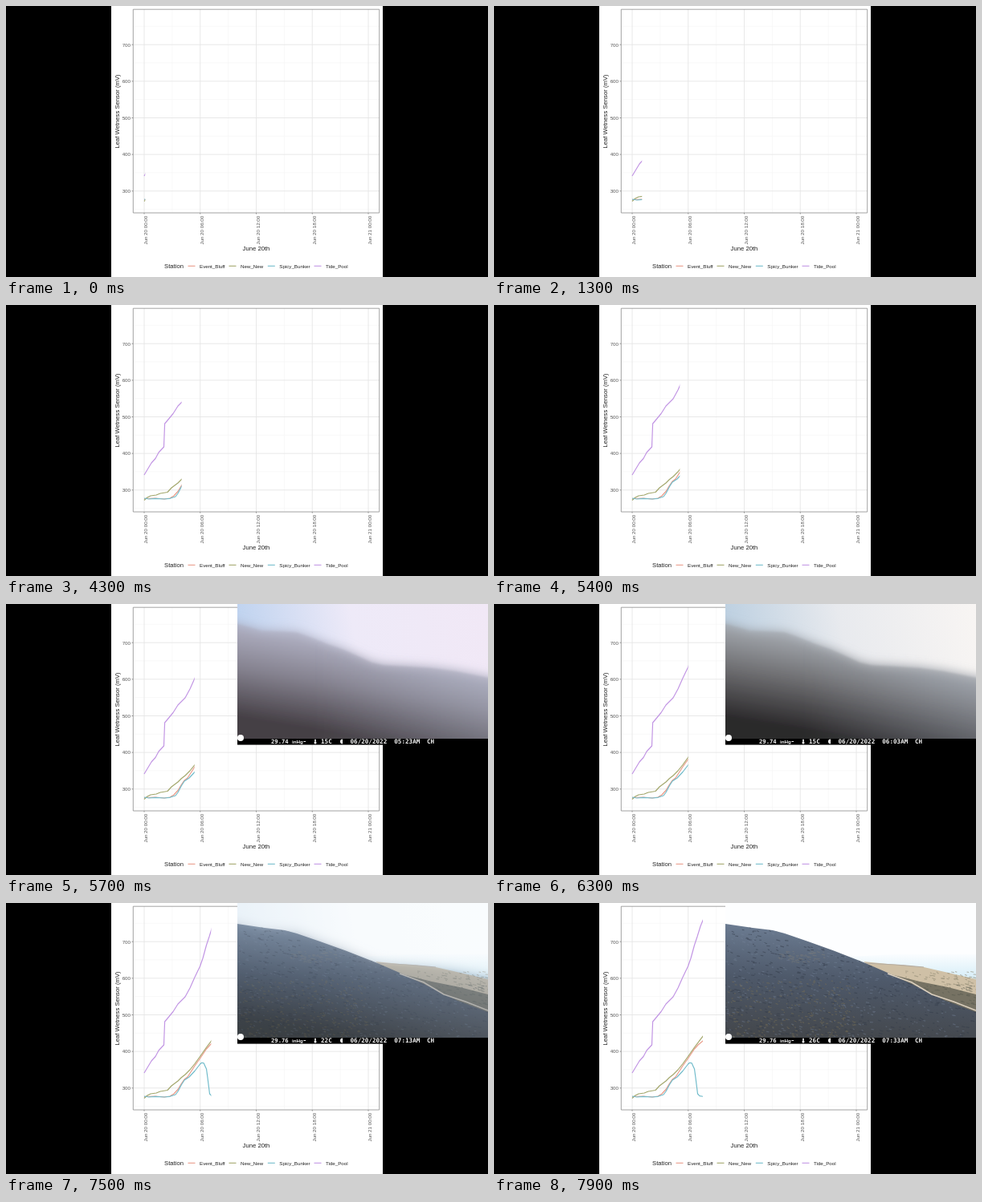
Write an HTML page that moves like this. It is 600 px wide and 338 px high and loops after 8 s.

```html
<!DOCTYPE html>
<html lang="en">
<head>
<meta charset="utf-8">
<title>Leaf wetness, June 20th</title>
<style>
html, body { margin: 0; width: 100%; height: 100%; overflow: hidden; background: #000; }
svg { display: block; width: 100vw; height: 100vh; }
text { font-family: "Liberation Sans", Arial, sans-serif; }
.tick { font-size: 6.2px; fill: #555; }
.key { font-size: 6.2px; fill: #222; }
.title { font-size: 7.7px; fill: #222; }
.stamp { font: bold 7.6px "DejaVu Sans Mono", monospace; fill: #f4f4f4; }
.unit { font: bold 6.2px "Liberation Sans", Arial, sans-serif; fill: #f4f4f4; }
</style>
</head>
<body>
<svg id="stage" viewBox="0 0 600 338">
  <defs>
    <clipPath id="reveal"><rect id="window" x="165" y="4" height="254"/></clipPath>
    <clipPath id="photoBox"><rect x="288" y="0" width="312" height="168"/></clipPath>
    <linearGradient id="sky" x1="0" y1="0.1" x2="1" y2="0">
      <stop/><stop offset="0.45"/><stop offset="1"/>
    </linearGradient>
    <linearGradient id="hill" gradientUnits="userSpaceOnUse" x1="440" y1="55" x2="422" y2="163">
      <stop/><stop offset="0.45"/><stop offset="1"/>
    </linearGradient>
    <linearGradient id="haze">
      <stop offset="0.35" stop-color="#cfdcf0" stop-opacity="0"/>
      <stop offset="1" stop-color="#cfdcf0" stop-opacity="0.25"/>
    </linearGradient>
    <linearGradient id="slope" x1="0.1" y1="0" x2="0" y2="1">
      <stop stop-color="#6c7c92"/><stop offset="0.45" stop-color="#4e596a"/>
      <stop offset="1" stop-color="#43464a"/>
    </linearGradient>
    <linearGradient id="sea" x1="0" y1="0" x2="0" y2="1">
      <stop stop-color="#fafdff"/><stop offset="1" stop-color="#cfeaf6"/>
    </linearGradient>
    <filter id="soft" x="-10%" y="-10%" width="120%" height="120%"><feGaussianBlur stdDeviation="1.3"/></filter>
    <filter id="fog" x="-10%" y="-20%" width="120%" height="140%"><feGaussianBlur stdDeviation="7"/></filter>
    <clipPath id="slopeShape"><path id="slopeClip"/></clipPath>
  </defs>
  <rect width="600" height="338"/>
  <rect x="131" width="338" height="338" fill="#fff"/>
  <g id="chart"></g>
  <g id="lines" fill="none" stroke-width="1.2" stroke-linejoin="round" clip-path="url(#reveal)"></g>
  <g id="camera">
    <rect x="288" width="312" height="175.6"/>
    <g clip-path="url(#photoBox)">
      <rect x="288" width="312" height="168" fill="url(#sky)"/>
      <g id="foggy"></g>
      <g id="clear"></g>
    </g>
    <circle cx="292" cy="167" r="4" fill="#fff"/>
    <text class="stamp" id="pressure" x="330" y="174.3" style="font-size:7.2px"></text>
    <text class="unit" x="356" y="173.8">inHg</text>
    <path d="M370.5 171.5h2.5" stroke="#fff"/>
    <path d="M385 168.8v3" stroke="#fff" stroke-width="1.6"/>
    <circle cx="385" cy="173" r="1.5" fill="#fff"/>
    <text class="stamp" id="temperature" x="392" y="174.3"></text>
    <path d="M419 168.6a3 3 0 0 0 0 6z" fill="#fff"/>
    <text class="stamp" x="428.5" y="174.3">06/20/2022</text>
    <text class="stamp" id="clock" x="483.3" y="174.3"></text>
    <text class="stamp" x="524" y="174.3">CH</text>
  </g>
</svg>
<script>
const LOOP = 8000, STEP = 100, CAMERA_START = 5500;
const X0 = 172, HOUR = 11.63, SPEED = 0.01148, DELAY = 235;
const $ = id => document.getElementById(id);

function add(parent, tag, attrs, text) {
  const el = document.createElementNS('http://www.w3.org/2000/svg', tag);
  for (const name in attrs) el.setAttribute(name, attrs[name]);
  if (text) el.textContent = text;
  parent.appendChild(el);
  return el;
}

const chart = $('chart');
const rule = (d, stroke, width) =>
  add(chart, 'path', { d, stroke, 'stroke-width': width, fill: 'none' });
const label = (x, y, text, cls, anchor = 'start', turn) =>
  add(chart, 'text', { x, y, class: cls, 'text-anchor': anchor,
    ...(turn && { transform: `rotate(-90 ${x} ${y})` }) }, text);

function drawChart() {
  for (let i = 0; i < 6; i++) rule(`M158 ${25.3 + i * 45.65}H465`, '#f4f4f4', 0.6);
  for (let i = 0; i < 4; i++) rule(`M${206.9 + i * 69.75} 4V258`, '#f4f4f4', 0.6);
  for (let i = 0; i < 5; i++) {
    const y = 48.2 + i * 45.65, x = X0 + i * 69.75;
    rule(`M158 ${y}H465M${x} 4V258`, '#e6e6e6', 0.9);
    rule(`M156.5 ${y}H158M${x} 258V259.6`, '#777', 0.8);
    label(155, y + 2.3, String(700 - i * 100), 'tick', 'end');
    const day = i < 4 ? 20 : 21, hour = String(i * 6 % 24).padStart(2, '0');
    label(x + 4.4, 261.8, `Jun ${day} ${hour}:00`, 'tick', 'end', true);
  }
  rule('M158.3 4.2H464.7V258H158.3Z', '#8c8c8c', 0.8);
  label(141, 131.5, 'Leaf Wetness Sensor (mV)', 'title', 'middle', true);
  label(311.5, 305.3, 'June 20th', 'title', 'middle');
  label(197, 327.3, 'Station', 'title');
}

const stations = [
  { name: 'Event_Bluff', x: 241, color: '#e99a88',
    points: '172,241.5 186,241 197,242 204,241 209,238 214,232.5 218.5,225 222,220 226,217 235,203 241.5,194 249.5,182 254,177 260.5,171.5' },
  { name: 'New_New', x: 292, color: '#a3a76c',
    points: '172,243.5 176,240 180,238 187,237 192,235 201,233.5 206,228 214,222 218.5,217.5 223,214 229,208 235,200.5 241.5,191.5 249.5,180 260.5,165.5' },
  { name: 'Spicy_Bunker', x: 340.3, color: '#72bccb',
    points: '172,241 178,242 186,241.3 197,242 204,241.3 211,239 214,235 218.5,226.5 222,221 228,217 235,209.5 241.5,201 243.5,199.3 246,199.5 249.5,207 251,218 253.5,238 256,240.7 260.5,241.3' },
  { name: 'Tide_Pool', x: 398, color: '#c296e4',
    points: '172,212 175,207 181,197 186,191.5 190,184 196.5,177 197.6,148 201,144 208,135.5 214,126 218.5,121.5 223,117 229,106 235,92.5 241.5,79 245,69 249.5,52.5 253,42 257,29 260.5,20.5' }
];

function drawStations() {
  for (const { name, x, color, points } of stations) {
    add($('lines'), 'polyline', { points, stroke: color });
    rule(`M${x - 14.5} 324.3h9`, color, 1.1);
    label(x, 326.6, name, 'key');
  }
}

let seed = 7;
const random = () => (seed = seed * 16807 % 2147483647) / 2147483647;

// Many short brush marks in one path
function marks(parent, count, [x, y, w, h], size, stroke, opacity) {
  let d = '';
  for (let i = 0; i < count; i++) {
    const px = x + random() * w, py = y + random() * h;
    d += `M${px.toFixed(1)} ${py.toFixed(1)}l${(1 + random() * size).toFixed(1)} ${(random() * 1.4).toFixed(1)}`;
  }
  add(parent, 'path', { d, stroke, opacity, 'stroke-width': 1.1, fill: 'none' });
}

function drawFog() {
  const d = 'M250 18L288 25L310 31L318 33.5L345 34.5L362 35.5L380 42L400 50L420 57L440 66L455 73L470 76.5L500 78L530 80L560 84L600 92L640 100V210H250Z';
  const foggy = $('foggy');
  add(foggy, 'path', { d, fill: 'url(#hill)', filter: 'url(#fog)' });
  add(foggy, 'path', { d, fill: 'url(#hill)', filter: 'url(#soft)', opacity: 0.5 });
  add(foggy, 'path', { d, fill: 'url(#haze)', filter: 'url(#fog)' });
}

function drawClearView() {
  const slope = 'M288 26L322 31L347 34L362 38L391 48L423 59.5L460 74L490 87L520 101L560 121L600 136V168H288Z';
  const clear = $('clear');
  $('slopeClip').setAttribute('d', slope);
  const shape = (d, fill) => add(clear, 'path', { d, fill });
  const trail = (d, stroke, width) =>
    add(clear, 'path', { d, stroke, 'stroke-width': width, fill: 'none' });
  shape('M288 0H600V168H288Z', '#fdfeff');
  shape('M440 67L500 64H600V100L470 80Z', 'url(#sea)');
  shape('M460 73L490 76L535 80L570 88L600 95V125H530L480 88Z', '#cfc0a6');
  shape('M490 88L530 98L565 105L600 114V142H550Z', '#767263');
  marks(clear, 70, [505, 85, 92, 18], 4, '#8f8973', 0.6);
  marks(clear, 50, [535, 102, 65, 28], 4, '#5a5c50', 0.6);
  trail('M462 75L500 77L535 80', '#b5aca0', 1.2);
  shape(slope, 'url(#slope)');
  trail('M490 88L520 99L545 114L572 123L600 134', '#dcd0bf', 1.5);
  const brush = add(clear, 'g', { 'clip-path': 'url(#slopeShape)' });
  marks(brush, 650, [288, 30, 312, 138], 4, '#323b48', 0.5);
  marks(brush, 450, [288, 30, 300, 138], 3, '#77869c', 0.4);
  marks(brush, 260, [288, 95, 160, 73], 2.5, '#7b7054', 0.5);
  marks(brush, 60, [350, 60, 60, 14], 4, '#837f79', 0.4);
}

// Minute of the day, three sky tones, three hill tones
const moods = [
  [323, '#bfd3ef', '#eeeaf8', '#f1e8f6', '#adadbf', '#85828f', '#453f45'],
  [363, '#bdd0e1', '#e8eaee', '#f8f5f3', '#a0a4aa', '#6e6e71', '#2b292b'],
  [403, '#b0cfe7', '#dcebf6', '#e4f2fa', '#93abc1', '#667b90', '#273037'],
  [453, '#e4eef8', '#ffffff', '#ffffff', '#8797ab', '#5a6675', '#33373b']
];

function mix(a, b, k) {
  const channel = (hex, i) => parseInt(hex.substr(1 + 2 * i, 2), 16);
  return `rgb(${[0, 1, 2].map(i => Math.round(channel(a, i) * (1 - k) + channel(b, i) * k))})`;
}

const clamp = v => Math.min(1, Math.max(0, v));

function showPhoto(minute) {
  let i = 0;
  while (i < moods.length - 2 && minute >= moods[i + 1][0]) i++;
  const [from, to] = [moods[i], moods[i + 1]];
  const k = clamp((minute - from[0]) / (to[0] - from[0]));
  document.querySelectorAll('#sky stop, #hill stop').forEach((stop, n) =>
    stop.setAttribute('stop-color', mix(from[n + 1], to[n + 1], k)));
  const lift = clamp((minute - 403) / 50);
  $('clear').setAttribute('opacity', lift);
  $('pressure').textContent = minute < 433 ? '29.74' : '29.76';
  $('temperature').textContent = (minute < 403 ? 15 : Math.round(16 + 10 * lift)) + 'C';
  const two = n => String(n).padStart(2, '0');
  $('clock').textContent = `${two(Math.floor(minute / 60))}:${two(minute % 60)}AM`;
}

function render(time) {
  const t = Math.floor(time % LOOP / STEP) * STEP;
  const length = Math.max(1.3, (t - DELAY) * SPEED);
  $('window').setAttribute('width', X0 + length - 165);
  const visible = t >= CAMERA_START;
  $('camera').setAttribute('visibility', visible ? 'visible' : 'hidden');
  if (visible) {
    const minute = Math.round((length / HOUR * 60 - 3) / 10) * 10 + 3;
    showPhoto(Math.max(323, minute));
  }
}

drawChart();
drawStations();
drawFog();
drawClearView();
const start = performance.now();
function tick() {
  render(performance.now() - start);
  requestAnimationFrame(tick);
}
tick();
</script>
</body>
</html>
```
